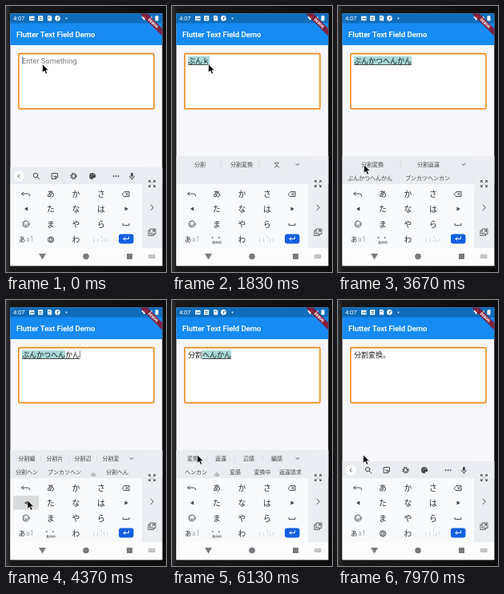
An HTML page for the animation above (8 s loop, 200x333 px).

```html
<!DOCTYPE html>
<html lang="ja">
<head>
<meta charset="utf-8">
<title>Text field demo</title>
<style>
  html, body { margin: 0; width: 100%; height: 100%; overflow: hidden; background: #191919; }
  svg { display: block; width: 100vw; height: 100vh; }
  text { font-family: Roboto, "Noto Sans CJK JP", "Noto Sans CJK", sans-serif; }
  .mid { text-anchor: middle; }
  .line { fill: none; stroke: #43474b; stroke-width: .95; stroke-linecap: round; stroke-linejoin: round; }
  .solid { fill: #43474b; }
  .candidate { font-size: 7px; fill: #43474b; text-anchor: middle; }
  .note { font-size: 4.2px; fill: #55595d; text-anchor: middle; }
  .divider { stroke: #d3d6da; stroke-width: .8; }
</style>
</head>
<body>
<svg viewBox="0 0 200 333" preserveAspectRatio="none">
  <defs>
    <clipPath id="screen"><rect x="5.4" y="9.6" width="189.9" height="315.6"/></clipPath>
    <linearGradient id="bezel"><stop stop-color="#333"/><stop offset=".03" stop-color="#191919"/><stop offset="1" stop-color="#0c0c0c"/></linearGradient>
  </defs>
  <rect width="200" height="333" fill="url(#bezel)"/>
  <g clip-path="url(#screen)">
    <rect x="5" y="9" width="191" height="317" fill="#f7f6fa"/>
    <rect x="5" y="9" width="191" height="40" fill="#158bf3"/>
    <rect x="5" y="9" width="191" height="12.5" fill="#0f6cb9"/>

    <g fill="#fff">
      <text x="9" y="18.4" font-size="7.6">4:07</text>
      <path d="M29 12.7h6.5v5.6h-6.5zM40 12.3h6.2v6.2h-6.2zM52 12h3.6l1.6 1.6v5h-5.2z"/>
      <circle cx="64.4" cy="15.4" r="3.3"/>
      <circle cx="75.5" cy="15.5" r=".9"/>
      <path d="M169.5 13.7q3.3-2.4 6.6 0l-3.3 4.4zM182.5 12.5v5.8h-5.8zM186.5 12.7h1v-.8h2v.8h1v5.8h-4z"/>
      <path d="M30.2 17l1.6-2 1.2 1 1-1.2 1 2M41.5 14.5h3.2m-3.2 2h3.2M53.5 13.5v1.7m1.6-1.7v1.7M64.5 17.2v-3h2"
            fill="none" stroke="#0f6cb9" stroke-width=".9"/>
    </g>
    <text x="13" y="38.6" font-size="9.5" font-weight="500" fill="#fff" stroke="#fff" stroke-width=".15">Flutter Text Field Demo</text>
    <g transform="translate(195.5 10) rotate(45)">
      <rect x="-22" y="13" width="44" height="6.6" fill="#8c1428" fill-opacity=".88"/>
      <text class="mid" y="18" font-size="4.8" font-weight="900" fill="#fff">DEBUG</text>
    </g>

    <rect x="15.8" y="59.6" width="169.2" height="69" rx="1.2" fill="#fff" stroke="#ee8a1d" stroke-width="1.6"/>
    <rect id="highlight" y="63" height="10.5" fill="#a8d8d6"/>
    <text id="hint" x="20" y="72" font-size="9.3" fill="#77777a">Enter Something</text>
    <text id="value" x="20" y="71.8" font-size="9" fill="#18191a"></text>
    <rect id="underline" y="73" height=".8" fill="#222"/>
    <rect id="caret" y="63" width=".7" height="10.5" fill="#5c646c"/>

    <rect id="strip" x="5" width="191" fill="#e9ecf0"/>
    <rect x="5" y="223" width="165" height="80" fill="#f8fafc"/>
    <rect id="side" x="170" width="26" fill="#eaedf1"/>
    <rect x="5" y="303" width="191" height="23" fill="#fdfdfd"/>
    <rect id="pressed" x="9" y="245" width="32" height="17.5" rx="1.5" fill="#dadbdc"/>

    <g id="toolbar">
      <circle cx="16" cy="213" r="6.5" fill="#fff"/>
      <path class="line" d="M17 210.8l-2.2 2.2 2.2 2.2"/>
      <circle class="line" cx="37" cy="212" r="2.7"/>
      <path class="line" d="M39 214l2.8 2.8"/>
      <path class="line" d="M57.5 209.5h7v4.5l-2.5 2.5h-4.5zM62 216.5V214h2.5M59.5 213q1.5 1.7 3 0"/>
      <circle class="line" cx="84.5" cy="213" r="3.4" stroke-dasharray="1.5 1.17" style="stroke-width:1.7;stroke-linecap:butt"/>
      <circle class="line" cx="84.5" cy="213" r="2.3"/>
      <path class="solid" d="M108 209a4 4 0 1 0 0 8c1.5 0 .3-2 1.7-2h1.3c2.5-.5 1-6-3-6z"/>
      <g fill="#e9ecf0"><circle cx="106" cy="213" r=".6"/><circle cx="107.3" cy="211" r=".6"/><circle cx="109.5" cy="211.2" r=".6"/></g>
      <g class="solid"><circle cx="134.6" cy="213" r=".9"/><circle cx="137.6" cy="213" r=".9"/><circle cx="140.6" cy="213" r=".9"/></g>
      <rect class="solid" x="156" y="208.7" width="2.8" height="5.2" rx="1.4"/>
      <path class="line" d="M154.5 213a2.9 2.7 0 0 0 5.8 0M157.4 215.8v1.6"/>
    </g>
    <g id="suggestions"></g>
    <path id="expand" class="line" d="M155 197.5l1.9 1.9 1.9-1.9"/>

    <g id="keys" class="mid" font-size="9.8" fill="#292c2f" font-weight="500"></g>
    <path class="line" d="M22 233l-2.5 2 2.5 2M19.7 235h7.5q2.5 0 2.5 2.7"/>
    <path class="solid" d="M27.2 251.5v5l-4.4-2.5zM148.5 251.5v5l4.4-2.5z"/>
    <circle class="line" cx="25" cy="273" r="4"/>
    <path class="line" d="M23.4 271.8v.1M26.6 271.8v.1M22.8 274q2.2 2.5 4.4 0"/>
    <text x="16" y="295" font-size="8.2" letter-spacing=".7" fill="#292c2f">あ<tspan fill="#a4a8ac">a1</tspan></text>
    <path class="line" d="M145.5 235.5l2.5-3h6v6h-6zM149.7 234l2.7 3m0-3l-2.7 3"/>
    <path class="line" d="M146 272.5v2h8v-2"/>
    <rect x="141" y="285.5" width="18.5" height="12" rx="3" fill="#1260e0"/>
    <path class="line" style="stroke:#fff" d="M153.5 289v2.5h-6.5M149 289.5l-2 2 2 2"/>
    <path d="M109.5 291v4h2m3-4v4h2m3-7v3m0 2.5v1m3-3.5v4h2m2-4v4" fill="none" stroke="#bcc0c4" stroke-width="1" stroke-dasharray="1.2 .8"/>
    <g id="globe" class="line" style="stroke-width:.7">
      <circle cx="56" cy="292.5" r="3.7"/><ellipse cx="56" cy="292.5" rx="1.6" ry="3.7"/>
      <path d="M52.8 291h6.4m-6.4 3h6.4"/>
    </g>
    <g id="marks" class="mid" font-weight="700" fill="#43474b">
      <text x="57.5" y="296" font-size="8.4">゛゜</text>
      <text x="56" y="298.4" font-size="4">大⇔小</text>
    </g>

    <path class="line" d="M181 221l-2.3-2.3m0 1.8v-1.8h1.8M184 221l2.3-2.3m0 1.8v-1.8h-1.8M181 224l-2.3 2.3m0-1.8v1.8h1.8M184 224l2.3 2.3m0-1.8v1.8h-1.8"/>
    <path class="line" d="M181.2 249l3 3.3-3 3.3"/>
    <path class="line" style="stroke-width:.8" d="M180 281h-2v6.5h6.5v-2M180.5 279h6.5v6.5h-6.5zM182 284l3.4-3.4m-2.2 0h2.2v2.2"/>

    <path d="M41 310h9l-4.5 7.5z" fill="#777b7f"/>
    <circle cx="100" cy="313.5" r="3.8" fill="#777b7f"/>
    <rect x="151" y="310" width="7" height="7" fill="#777b7f"/>
    <rect x="178" y="311" width="8.5" height="5" rx=".7" fill="#b5b8bb"/>
    <path d="M179 312.6h6.5m-6.5 1.6h6.5" stroke="#fdfdfd" stroke-width=".6" stroke-dasharray=".8 .6"/>
  </g>
  <path id="pointer" d="M0 0V10.2L2.4 8 4.2 12 6 11.2 4.3 7.4H7.6Z" fill="#000" stroke="#fff" stroke-width=".6"/>
</svg>
<script>
const LOOP = 8000, EM = 9, LEFT = 20;
const $ = id => document.getElementById(id);
const show = (id, on) => $(id).setAttribute('visibility', on ? 'visible' : 'hidden');
const set = (id, attrs) => Object.entries(attrs).forEach(([k, v]) => $(id).setAttribute(k, v));

// Candidate rows list each label after its centre x.
const bun = '26分 61文 96ぶん 131聞';
const bunkatsu = '35分割 87分割変換 131文';
const converting = '43分割変換 113分割編';
const whole = ['43分割変換 113分割返還', '40ぶんかつへんかん 112ブンカツヘンカン'];

// time, committed text, composing text, highlighted length, candidate rows, note x
const steps = [
  [0, '', '', 0],
  [1400, '', 'ｂ', 1, '26ｂ 61b 96B 131Ｂ'],
  [1525, '', 'ぶ', 1, '26部 61分 96ぶ 131無'],
  [1650, '', 'ぶｎ', 2, bun],
  [1780, '', 'ぶんｋ', 3, bunkatsu],
  [1910, '', 'ぶんか', 3, '35文化 87分割 131分解'],
  [2035, '', 'ぶんかｔ', 4, bunkatsu],
  [2160, '', 'ぶんかｔｓ', 5, bunkatsu],
  [2285, '', 'ぶんかつ', 4, '26分割 61分轄 96文かつ 131分かつ'],
  [2410, '', 'ぶんかつｈ', 5, converting],
  [2535, '', 'ぶんかつへ', 5, converting],
  [2660, '', 'ぶんかつへｎ', 6, converting],
  [2790, '', 'ぶんかつへんｋ', 7, converting],
  [2915, '', 'ぶんかつへんか', 7, converting],
  [3040, '', 'ぶんかつへんかｎ', 8, converting],
  [3165, '', 'ぶんかつへんかん', 8, ...whole],
  [4050, '', 'ぶんかつへんかん', 7, '35分割変化 87分割へんか', '35ブンカツヘンカ 109分割返歌'],
  [4300, '', 'ぶんかつへんかん', 6, '26分割編 61分割片 96分割辺 131分割変', '26分割ヘン 73ブンカツヘン 139分割へん', 109],
  [4550, '', 'ぶんかつへんかん', 5, '26分割へ 61分割屁 96文活へ 131分活へ', '30ぶんかつへ 78ブンカツヘ 139分割ヘ', 106],
  [4800, '', 'ぶんかつへんかん', 4, '26分割 61分轄 96文かつ 131分かつ', '26ぶんかつ 64ブンカツ 113分活 148文活', 91],
  [5620, '分割', 'へんかん', 4, '26変換 61返還 96辺感 131編感', '30ヘンカン 79変感 113変換中 148返還請求', 56],
  [6550, '分割変換', '', 0],
  [7000, '分割変換', '。', 1, '26。 61． 96. 131・'],
  [7400, '分割変換。', '', 0]
];

// time, x, y of the pointer tip
const path = [[0, 45.6, 73], [3350, 45.6, 73], [3850, 27, 251], [4950, 27, 251], [5350, 31.6, 194], [LOOP, 31.6, 194]];

$('keys').innerHTML = ['あかさ', 'たなは', 'まやら', ' わ'].map((row, r) =>
  [...row].map((ch, c) => `<text x="${56 + c * 31.5}" y="${238.6 + r * 19}">${ch}</text>`).join('')).join('');

const parseRow = row => [...row.matchAll(/(\d+)(\D+)/g)].map(([, x, label]) => [+x, label.trim()]);

const labels = (row, y) => parseRow(row).map(([x, label]) =>
  `<text class="candidate" x="${x}" y="${y}">${label}</text>`).join('');

const dividers = row => parseRow(row).slice(1).map(([x], i) =>
  `<path class="divider" d="M${(x + parseRow(row)[i][0]) / 2} 193.5v9"/>`).join('');

function showStep([, done, typing, marked, first = '', second = '', noteX]) {
  const composing = typing.length > 0;
  const start = LEFT + done.length * EM;
  const top = composing ? 188 : 202;
  $('value').textContent = done + typing;
  set('highlight', { x: start, width: marked * EM });
  set('underline', { x: start, width: typing.length * EM });
  set('caret', { x: start + typing.length * EM });
  set('strip', { y: top, height: 223 - top });
  set('side', { y: top, height: 303 - top });
  show('hint', !(done + typing));
  show('toolbar', !composing);
  show('globe', !composing);
  show('marks', composing);
  show('expand', composing);
  $('suggestions').innerHTML = dividers(first) + labels(first, 200.6) + labels(second, 217.6) +
    (noteX ? `<text class="note" x="${noteX}" y="220">[全]</text>` : '');
}

function pointerAt(t) {
  const i = path.findIndex(p => p[0] > t);
  const [t0, x0, y0] = path[i - 1], [t1, x1, y1] = path[i];
  const u = (t - t0) / (t1 - t0), e = u * u * (3 - 2 * u);
  return [x0 + (x1 - x0) * e, y0 + (y1 - y0) * e];
}

let current;
function draw(now) {
  const t = now % LOOP;
  const step = steps.findLast(s => s[0] <= t);
  if (step !== current) showStep(current = step);
  const [since, , typing, marked] = step;
  const allMarked = typing && marked === typing.length;
  show('caret', !allMarked && (t - since) % 1000 < 500);
  show('pressed', [4050, 4300, 4550, 4800].some(c => t >= c - 60 && t < c + 110));
  set('pointer', { transform: `translate(${pointerAt(t)})` });
}

const begin = performance.now();
function tick() {
  draw(performance.now() - begin);
  requestAnimationFrame(tick);
}
tick();
</script>
</body>
</html>
```
